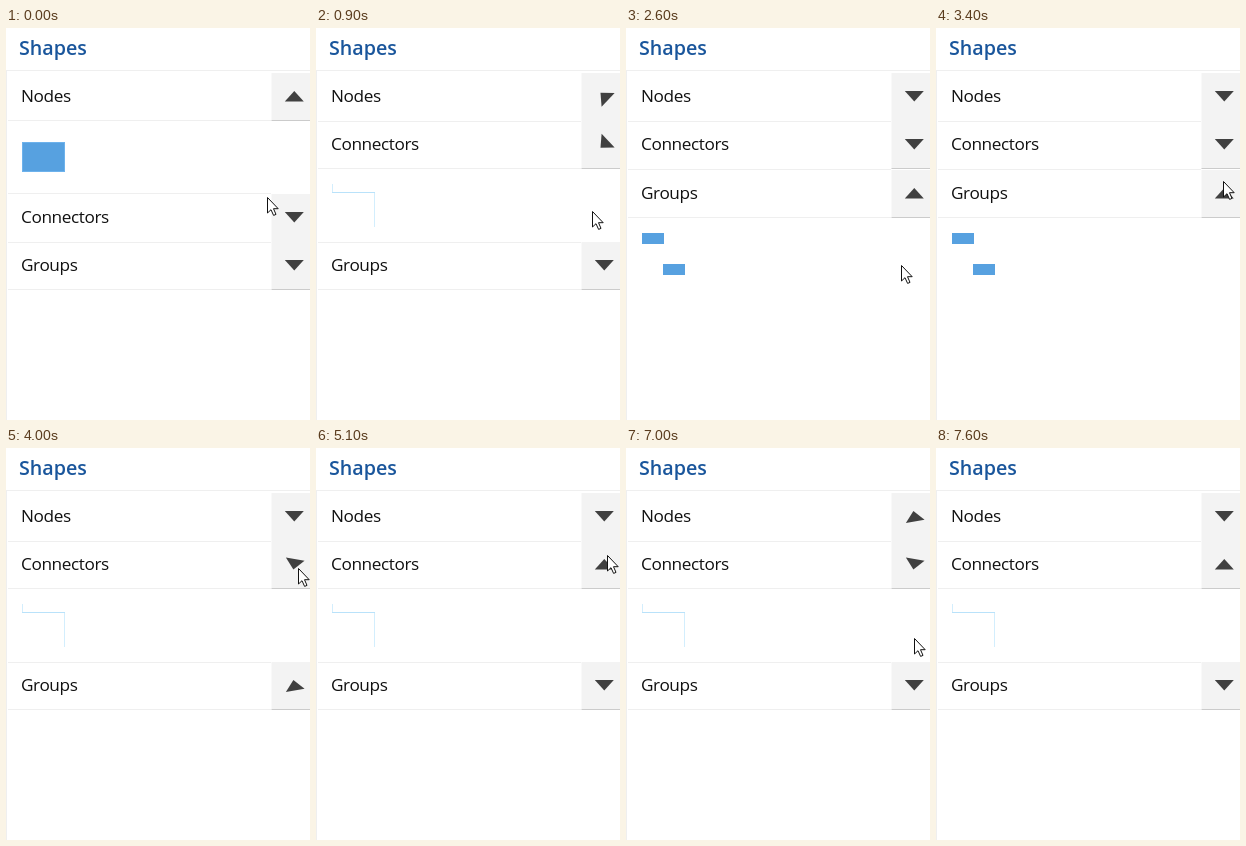
Write an HTML page that moves like this. It is 304 px wide and 392 px high and loops after 8.1 s.

```html
<!DOCTYPE html>
<html lang="en">
<head>
<meta charset="utf-8">
<title>Shapes palette</title>
<style>
  html, body { margin: 0; height: 100%; overflow: hidden; background: #fff; }
  svg { display: block; width: 304px; height: 392px; }
  text { font: 17.2px "Open Sans", "Noto Sans", sans-serif; letter-spacing: -.4px; fill: #111; }
  .title { font-size: 19.7px; font-weight: 600; letter-spacing: 0; fill: #1a569c; }
  .line { fill: #efefef; }
  .node { fill: #57a1e0; }
</style>
</head>
<body>
<svg viewBox="0 0 304 392">
  <text class="title" x="13" y="27">Shapes</text>
  <path class="line" d="M0 42H304V43H1V392H0Z"/>
  <g id="rows"></g>
  <g class="content">
    <rect class="node" x="16.5" y="114.5" width="42" height="29" stroke="#6db2ec"/>
  </g>
  <g class="content" fill="none">
    <path d="M16.5 156V164M58.5 165V199" stroke="#d3eefd"/>
    <path d="M16 164.5H59" stroke="#b9e2fa"/>
  </g>
  <g class="content">
    <rect class="node" x="16" y="205" width="22" height="11"/>
    <rect class="node" x="37" y="236" width="22" height="11"/>
  </g>
  <path id="cursor" d="M.5 .5V16L4 12.7L6.6 18.4L9 17.4L6.5 11.7H11.2Z" fill="#fff" stroke="#111"/>
</svg>
<script>
const LOOP = 8100, STEP = 100;
const ROW = 48.4, CONTENT = 72.4, FIRST_CENTER = 68;

// [first step, last step, row that opens]
const toggles = [[900, 1000, 1], [2200, 2600, 2], [4000, 4300, 1], [5800, 6100, 0], [7000, 7300, 1]];
// [departure, arrival, x, y]
const moves = [
  [200, 400, 276, 183], [1200, 1700, 275, 237], [2900, 3600, 292, 120],
  [5000, 5100, 291, 107], [5100, 5500, 282, 61], [6100, 6600, 288, 190], [7200, 7600, 306, 317]
];

const cursor = document.getElementById("cursor");
const contents = document.querySelectorAll(".content");
const progress = (t, from, to) => Math.min(1, Math.max(0, (t - from) / (to - from)));
const smooth = p => p * p * (3 - 2 * p);
const mix = (a, b, p) => a + (b - a) * p;
const show = (el, on) => el.setAttribute("visibility", on ? "visible" : "hidden");

const rows = ["Nodes", "Connectors", "Groups"].map((label, i) => {
  const row = document.createElementNS("http://www.w3.org/2000/svg", "g");
  row.innerHTML = `
    <rect class="top line" x="2" width="263" height="1"/>
    <rect class="bottom line" x="2" width="263" height="1"/>
    <rect x="265.5" y="-23" width="39" height="48" fill="#f3f3f3"/>
    <rect class="edge" x="265.5" width="39" height="1" fill="#cbcbcb"/>
    <text x="15" y="6">${label}</text>
    <path class="arrow" d="M-9.5 -5.25H9.5L0 5.25Z" fill="#404040"/>`;
  show(row.querySelector(".top"), i > 0);
  document.getElementById("rows").append(row);
  return row;
});

function drawRows(t) {
  let open = 0, previous = 0, turn = 1;
  for (const [first, last, next] of toggles) {
    if (t < first) break;
    previous = open;
    open = next;
    turn = smooth(progress(t, first - STEP / 2, last));
  }
  rows.forEach((row, i) => {
    const part = name => row.querySelector(name);
    const center = FIRST_CENTER + ROW * i + (i > open ? CONTENT : 0);
    const y = Math.round(center);
    const bottom = Math.floor(center + 24.4) - y;
    const angle = 180 * mix(previous === i, open === i, turn);
    row.setAttribute("transform", `translate(0 ${y})`);
    part(".top").setAttribute("y", Math.round(center - 23.7) - y);
    part(".bottom").setAttribute("y", bottom);
    part(".edge").setAttribute("y", bottom);
    show(part(".bottom"), i === open || i === 2);
    show(part(".edge"), i === open || i === 2 || (i === 1 && open === 2));
    part(".arrow").setAttribute("transform", `translate(288.3 .25) rotate(${angle})`);
    show(contents[i], i === open);
  });
}

function drawCursor(t) {
  let x = 261, y = 169;
  for (const [from, to, endX, endY] of moves) {
    const p = progress(t, from, to);
    x = mix(x, endX, p);
    y = mix(y, endY, p);
  }
  cursor.setAttribute("transform", `translate(${Math.round(x)} ${Math.round(y)})`);
}

function frame() {
  const t = Math.floor(performance.now() % LOOP / STEP) * STEP;
  drawRows(t);
  drawCursor(t);
  requestAnimationFrame(frame);
}
frame();
</script>
</body>
</html>
```
